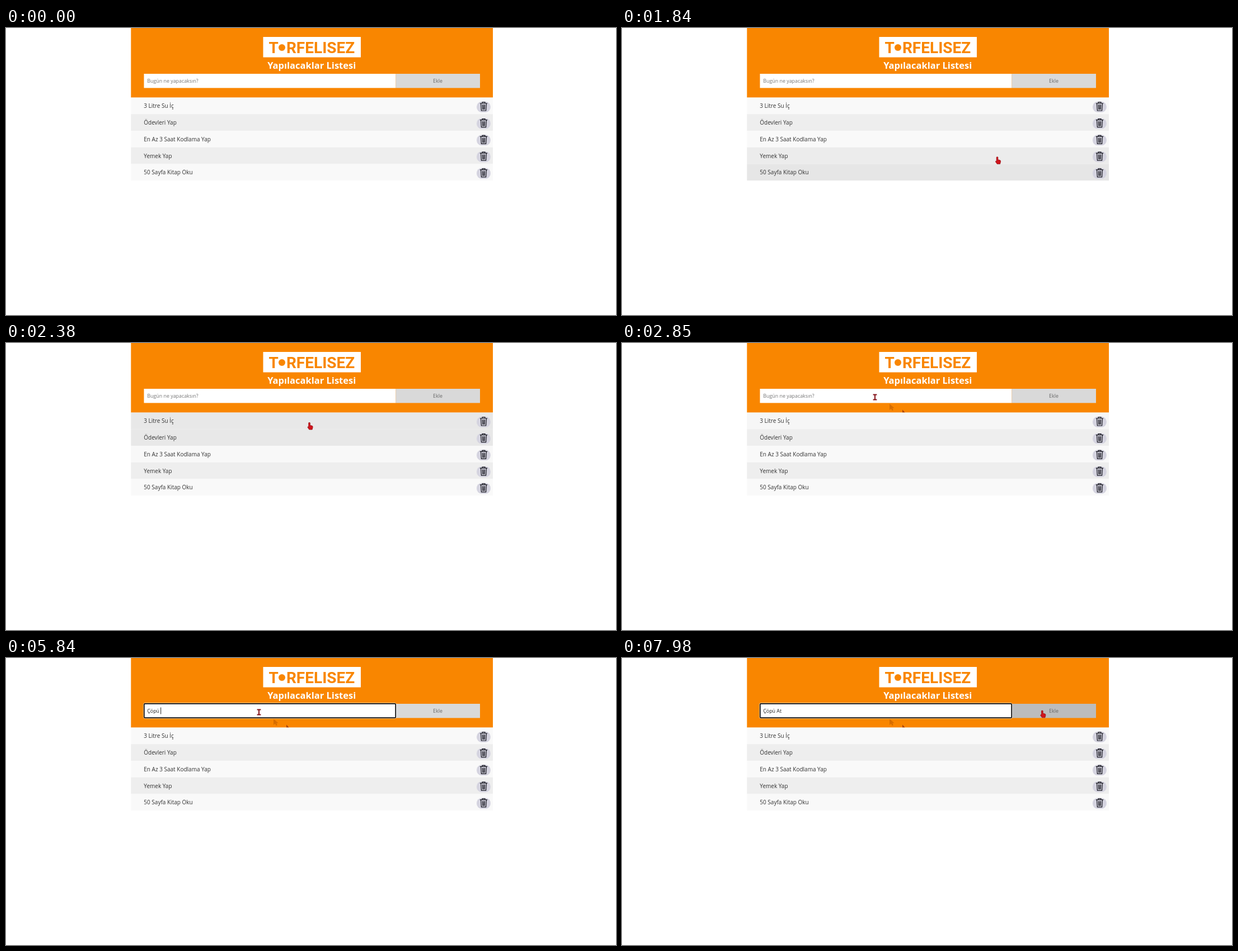
Write an HTML page that moves like this. It is 1090 px wide and 514 px high and loops after 8 s.

```html
<!DOCTYPE html>
<html lang="tr">
<head>
<meta charset="utf-8">
<style>
  html, body { margin: 0; width: 100%; height: 100%; overflow: hidden; background: #fff; }
  svg { display: block; width: 1090px; height: 514px; font-family: "Open Sans", "Noto Sans", sans-serif; }
  .brand { font: 700 28px Roboto, sans-serif; fill: #f98600; }
  .title { font-size: 16.5px; font-weight: 700; fill: #fff; text-anchor: middle; }
  .item { font-size: 10px; fill: #333; }
  .small { font-size: 8.9px; }
  .bin { fill: none; stroke: #14141c; stroke-width: 1.2; stroke-linecap: round; stroke-linejoin: round; }
</style>
</head>
<body>
<svg viewBox="0 0 1090 514">
  <rect x="223.3" width="646.7" height="124.6" fill="#f98600"/>
  <rect x="459.5" y="16" width="174.5" height="36.5" fill="#fff"/>
  <g class="brand">
    <text x="469.5" y="45">T</text>
    <circle cx="493" cy="35" r="6"/>
    <text x="501" y="45">RFELISEZ</text>
  </g>
  <text class="title" x="546.2" y="73">Yapılacaklar Listesi</text>
  <rect x="246.5" y="82" width="450" height="25.4" fill="#fff"/>
  <rect id="button" x="696.5" y="82" width="150.5" height="25.4"/>
  <text class="small" x="771.5" y="98" text-anchor="middle" fill="#666">Ekle</text>
  <g id="focus" fill="none">
    <rect x="245.8" y="80.8" width="451.2" height="27.4" rx="2" stroke="#fff" stroke-width=".8"/>
    <rect x="246.8" y="81.8" width="449.4" height="25.4" rx="1.5" stroke="#080808" stroke-width="1.7"/>
  </g>
  <text id="entry" class="small" x="252.2" y="98" xml:space="preserve"></text>
  <rect id="caret" y="88.5" width="1" height="12" fill="#222"/>
  <g id="list"></g>
  <path id="trailArrow" d="M478 109v11l2.8-2.4 2 3.6 2-1-1.6-3.4 3.4-.4z" fill="#d76d00"/>
  <path id="trailTip" d="M501 119.5l4.5 4.8h-4.5z" fill="#a8430c"/>
  <g id="cursor">
    <path id="arrow" d="M0 0v11l2.8-2.4 2 3.6 2-1-1.6-3.4 3.4-.4z" fill="#c4161c" stroke="#7a0c10" stroke-width=".6"/>
    <path id="beam" d="M-3.4-4.6h6.8M0-4.6v9.2M-3.4 4.6h6.8" fill="none" stroke="#85131a" stroke-width="2"/>
    <path id="hand" d="M-.5-.4Q.9-1.6 2.2-.4V4l4 1.2Q7.3 6 6.9 8L5.9 11.8H.6L-2.2 7.8Q-2.2 5.8-.5 7z" fill="#d0141c" stroke="#8a0c12" stroke-width=".7"/>
  </g>
</svg>
<script>
const LOOP = 8000, FRAME = 1000 / 15, ENTER = 1100, FOCUS = 3110;
const TOP = 124.6, ROW = 29.72;
const items = ["3 Litre Su İç", "Ödevleri Yap", "En Az 3 Saat Kodlama Yap", "Yemek Yap", "50 Sayfa Kitap Oku"];
const word = "Çöpü At";
const keyTimes = [4980, 5110, 5310, 5580, 5840, 5970, 6170];
// Pointer way points: time, x, y
const path = [
  [1100, 1013, 492], [1233, 978, 458], [1300, 945, 425], [1567, 780, 305], [1633, 739, 282],
  [1767, 694, 249], [1833, 670, 232], [2233, 567, 155], [2567, 503, 126], [2633, 478, 109],
  [2700, 463, 100], [2833, 452, 97], [7167, 452, 97], [7300, 470, 82], [7433, 522, 58],
  [7500, 546, 48], [7633, 668, 70], [7767, 735, 90], [7967, 750, 95]
];

const $ = id => document.getElementById(id);
const show = (id, on) => $(id).setAttribute("visibility", on ? "visible" : "hidden");
const grey = (from, to, k) => `rgb(${Array(3).fill(Math.round(from + (to - from) * k))})`;

$("list").innerHTML = items.map((text, i) => `
  <g transform="translate(0 ${TOP + i * ROW})">
    <rect id="row${i}" x="223.3" width="646.7" height="${ROW}"/>
    <text class="item" x="246.3" y="18.8">${text}</text>
    <rect x="841" y="7.2" width="24.8" height="19.2" rx="9" fill="#d5d4e0"/>
    <path class="bin" d="M847.3 10.4h12.4M851 10.2v-1.9h5v1.9M848.5 10.8l.9 12.6h8.2l.9-12.6M851.4 13l.3 8M853.5 13v8M855.6 13l-.3 8"/>
  </g>`).join("");

function pointer(time) {
  const t = ENTER + Math.floor((time - ENTER) / FRAME) * FRAME + 1;
  if (t < ENTER) return null;
  const n = path.findIndex(p => p[0] > t);
  if (n < 0) return path[path.length - 1].slice(1);
  const a = path[n - 1], b = path[n], k = (t - a[0]) / (b[0] - a[0]);
  return [a[1] + (b[1] - a[1]) * k, a[2] + (b[2] - a[2]) * k];
}

function zone(p) {
  if (!p) return "";
  const [x, y] = p;
  if (x > 223 && x < 870 && y >= TOP && y < TOP + ROW * items.length) return "row" + Math.floor((y - TOP) / ROW);
  if (y < 82 || y > 107.4 || x < 246.5 || x > 847) return "";
  return x < 696.5 ? "input" : "button";
}

// Hover amount: eases out towards 1 while pointed at, back towards 0 after
function hover(id, t) {
  let k = 0;
  for (let s = t - 700; s <= t; s += 10) k += ((zone(pointer(s)) === id) - k) * 0.1;
  return k;
}

function draw(t) {
  items.forEach((_, i) =>
    $("row" + i).setAttribute("fill", grey(i % 2 ? 238 : 249, 221, hover("row" + i, t))));
  $("button").setAttribute("fill", grey(217, 185, hover("button", t)));

  const typed = keyTimes.filter(k => k <= t).length;
  const entry = $("entry");
  entry.textContent = word.slice(0, typed) || "Bugün ne yapacaksın?";
  entry.setAttribute("fill", typed ? "#222" : "#757575");
  const since = t - (typed ? keyTimes[typed - 1] : FOCUS);
  show("focus", t >= FOCUS);
  show("caret", t >= FOCUS && Math.floor(since / 533) % 2 === 0);
  $("caret").setAttribute("x", 252 + (typed ? entry.getComputedTextLength() : 0));

  const p = pointer(t), z = zone(p);
  const shape = !p ? "" : z === "input" ? "beam" : z ? "hand" : "arrow";
  for (const id of ["arrow", "beam", "hand"]) show(id, id === shape);
  if (p) $("cursor").setAttribute("transform", `translate(${p})`);
  show("trailTip", t >= 2640);
  show("trailArrow", t >= 2710);
}

const start = performance.now();
function tick() {
  draw((performance.now() - start) % LOOP);
  requestAnimationFrame(tick);
}
tick();
</script>
</body>
</html>
```
